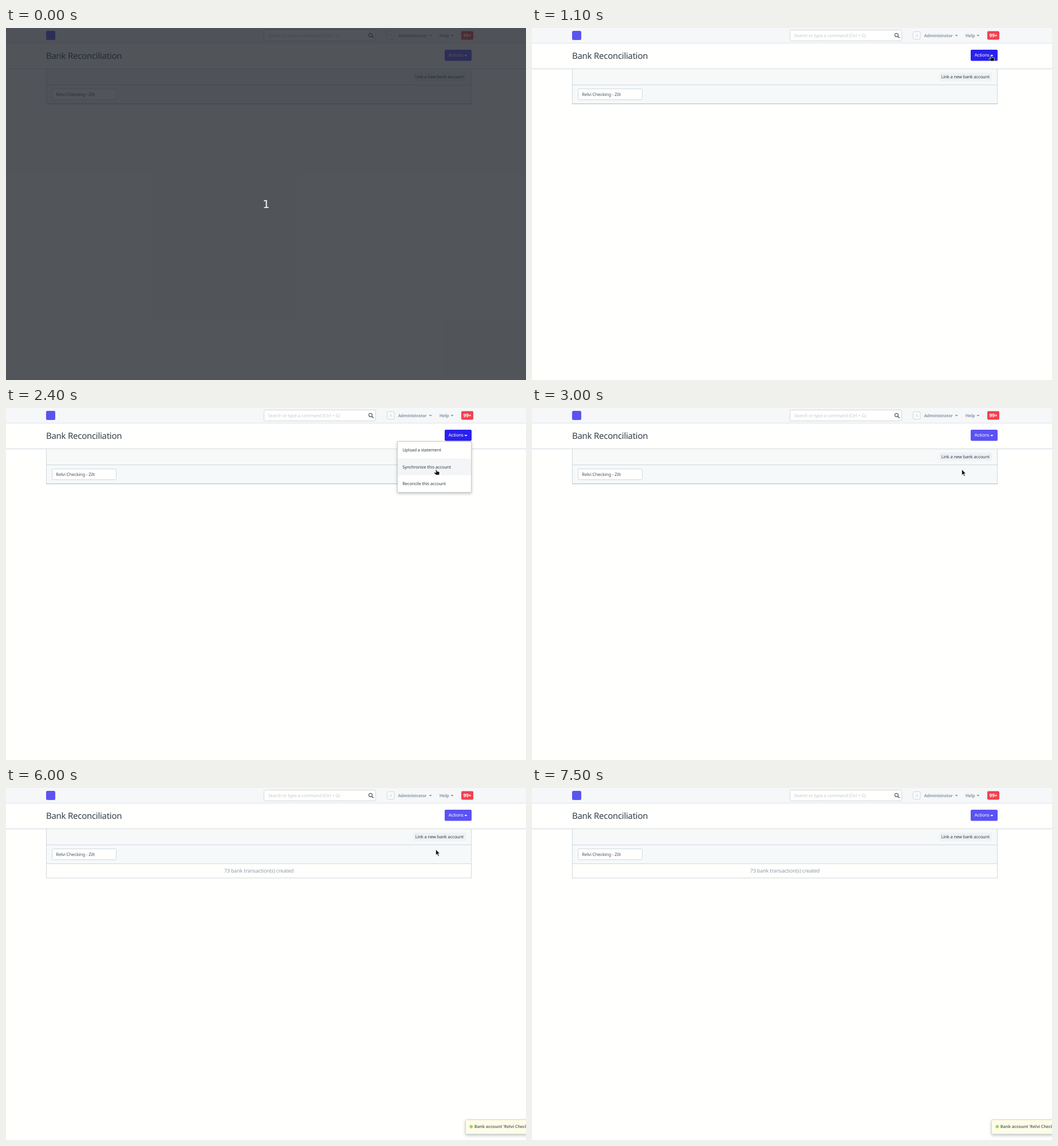
An HTML page for the animation above (8000 ms loop, 908x616 px).

```html
<!DOCTYPE html>
<html lang="en">
<head>
<meta charset="utf-8">
<title>Bank Reconciliation</title>
<style>
  html, body { margin: 0; width: 100%; height: 100%; overflow: hidden; background: #fffffd; }
  svg { display: block; width: 908px; height: 616px; }
  text {
    font: 7.6px "Noto Sans", "Open Sans", sans-serif;
    letter-spacing: -.02em;
    text-rendering: geometricPrecision;
    fill: #36414c;
    white-space: pre;
  }
  .bold { font-weight: 700; fill: #8d99a6; }
  .line { stroke: #d1d8dd; fill: none; }
  .caret { fill: #8d99a6; }
  .white { fill: #fff; }
  .drop { filter: drop-shadow(0 2px 2.5px rgba(0, 0, 0, .24)); }
</style>
</head>
<body>
<svg viewBox="0 0 908 616">
  <defs>
    <path id="caret" d="M-2.6-1.2H2.6L0 1.5Z"/>
  </defs>
  <rect width="908" height="616" fill="#fffffd"/>

  <g id="navbar">
    <rect width="908" height="26" fill="#f5f7f8"/>
    <path class="line" d="M0 26.5H908" stroke-opacity=".65"/>
    <rect x="70" y="5" width="16" height="16" rx="2.5" fill="#5b53ee"/>
    <rect class="line" x="450.5" y="3.5" width="195" height="19" rx="2" style="fill:#fffffd"/>
    <text x="457.5" y="15.7" style="font-size:7.76px;fill:#c3cad0">Search or type a command (Ctrl + G)</text>
    <g fill="none" stroke="#59636d" stroke-width="1.25">
      <circle cx="636.5" cy="12.3" r="3"/>
      <path d="M638.7 14.5L641.6 17.4" stroke-width="1.6"/>
    </g>
    <rect class="line" x="665.5" y="6.5" width="12.5" height="13" rx="2" style="fill:#fafbfc"/>
    <text x="671.7" y="16" text-anchor="middle" style="fill:#d1d8dd;font-size:8.2px">A</text>
    <text class="bold" x="684.7" y="15.7" style="font-size:7.35px">Administrator</text>
    <use href="#caret" class="caret" x="741.2" y="13.2"/>
    <text class="bold" x="756.7" y="15.7">Help</text>
    <use href="#caret" class="caret" x="779" y="13.2"/>
    <rect x="795" y="5.5" width="21" height="15" rx="2" fill="#f1414f"/>
    <text class="bold white" x="805.5" y="15.9" text-anchor="middle" style="font-size:8.4px;fill:#fff">99+</text>
  </g>

  <g id="panel">
    <rect x="70" y="72" width="743" height="27" fill="#f7f9f9"/>
    <rect x="70" y="99" width="743" height="33" fill="#f6f9fa"/>
    <path class="line" d="M0 71.5H908M70.5 72V132.5M812.5 72V132.5M70 99.5H813"/>
    <path id="panelEnd" d="M70 132.7H813" stroke="#b9c5ce" stroke-width="1.3"/>
    <rect x="711.5" y="78" width="91.5" height="14.5" rx="2" fill="#eff2f4"/>
    <text x="714.7" y="88">Link a new bank account</text>
    <rect class="line" x="80.5" y="106.5" width="112" height="19" rx="2" style="fill:#fffffd"/>
    <text x="87.3" y="118.7" style="font-size:7.8px;fill:#4c5660">Relvi Checking - Zilt</text>
  </g>

  <g id="result">
    <path class="line" d="M70.5 132.5H812.5V157.5H70.5Z" style="fill:#fffffd"/>
    <text x="441.6" y="148" text-anchor="middle" style="font-size:8.95px;fill:#8d99a6">73 bank transaction(s) created</text>
  </g>

  <text x="70" y="54.2" style="font-size:15.05px">Bank Reconciliation</text>
  <rect id="button" x="766" y="38" width="47" height="19.5" rx="2"/>
  <text class="white" x="772.7" y="50.4" style="font-size:7.85px;fill:#fff">Actions</text>
  <use href="#caret" class="white" x="803" y="48.2"/>

  <g id="menu">
    <rect class="drop" x="683.5" y="58.5" width="129" height="89" fill="#fffffd" stroke="#c9ced2"/>
    <rect id="hover" x="684" width="128" height="29.3" fill="#f4f5f6"/>
    <text x="692.2" y="76.2">Upload a statement</text>
    <text x="692.2" y="105.6">Synchronize this account</text>
    <text x="692.2" y="134.9">Reconcile this account</text>
  </g>

  <g id="toast">
    <rect class="drop" x="802.5" y="580.5" width="230" height="25" rx="2" fill="#fffce7" stroke="#d1d8dd"/>
    <circle cx="812.3" cy="592.6" r="2.8" fill="#98d85b"/>
    <text class="bold" x="817.7" y="595.3" style="font-size:7.4px;fill:#6c7680">Bank account 'Relvi Checking - Zilt' has been synchronized</text>
  </g>

  <g id="cursor" fill="#111" stroke="#fff" stroke-width=".7" stroke-linejoin="round">
    <path id="arrow" d="M0 0V10.2L2.4 8L4.1 11.9L5.8 11.2L4.1 7.3H7.1Z"/>
    <path id="hand" d="M-1 .5Q0-.6 1 .5L1.6 3L5 3.6Q6.2 4 6 5.5L5.5 9.4H0L-3.4 6Q-3.8 4.5-2 4.7L-.2 5.5Z"/>
  </g>

  <g id="countdown">
    <rect width="908" height="616" fill="#21252c" fill-opacity=".78"/>
    <text x="454" y="315" text-anchor="middle" style="font:19px 'DejaVu Sans',sans-serif;fill:#fff">1</text>
  </g>
</svg>
<script>
const LOOP = 8000, STEP = 100;
const el = id => document.getElementById(id);
const show = (id, on) => el(id).setAttribute("visibility", on ? "inherit" : "hidden");

// Each track holds its value until the next start time.
const cursorTrack = [
  [0, null],
  [700, ["arrow", 838, 75]],
  [800, ["arrow", 822, 63]],
  [900, ["hand", 806, 53]],
  [1000, ["hand", 803, 50]],
  [1100, ["hand", 801.5, 48.5]],
  [2000, ["hand", 794.5, 69]],
  [2100, ["hand", 770, 92]],
  [2200, ["hand", 757, 103.5]],
  [2400, ["hand", 751, 107.8]],
  [3000, ["arrow", 750.5, 107.5]],
  [7200, ["arrow", 640, 85]],
  [7300, ["arrow", 430, 46]],
  [7400, ["arrow", 168.5, 7.5]],
  [7500, null]
];
const buttonTrack = [
  [0, "#5a52f3"], [900, "#4038f0"], [1000, "#2a20ee"],
  [2600, "#463ef1"], [2700, "#5a52f3"]
];
const hoverTrack = [[0, null], [2000, 59], [2100, 88.3], [2600, null]];
const toastTrack = [[0, 0], [5500, .4], [5600, .9], [6000, 1]];

const at = (track, t) => track.filter(([start]) => start <= t).pop()[1];

function draw(time) {
  const t = Math.floor(time % LOOP / STEP) * STEP;
  show("countdown", t < 100);
  show("menu", t >= 1400 && t < 2600);
  show("result", t >= 5400);
  show("panelEnd", t < 5400);
  el("button").setAttribute("fill", at(buttonTrack, t));
  el("toast").setAttribute("opacity", at(toastTrack, t));

  const hoverY = at(hoverTrack, t);
  show("hover", hoverY !== null);
  if (hoverY !== null) el("hover").setAttribute("y", hoverY);

  const cursor = at(cursorTrack, t);
  show("cursor", cursor);
  if (cursor) {
    const [shape, x, y] = cursor;
    el("cursor").setAttribute("transform", `translate(${x} ${y})`);
    show("arrow", shape === "arrow");
    show("hand", shape === "hand");
  }
}

const start = performance.now();
function tick() {
  draw(performance.now() - start);
  requestAnimationFrame(tick);
}
tick();
</script>
</body>
</html>
```
